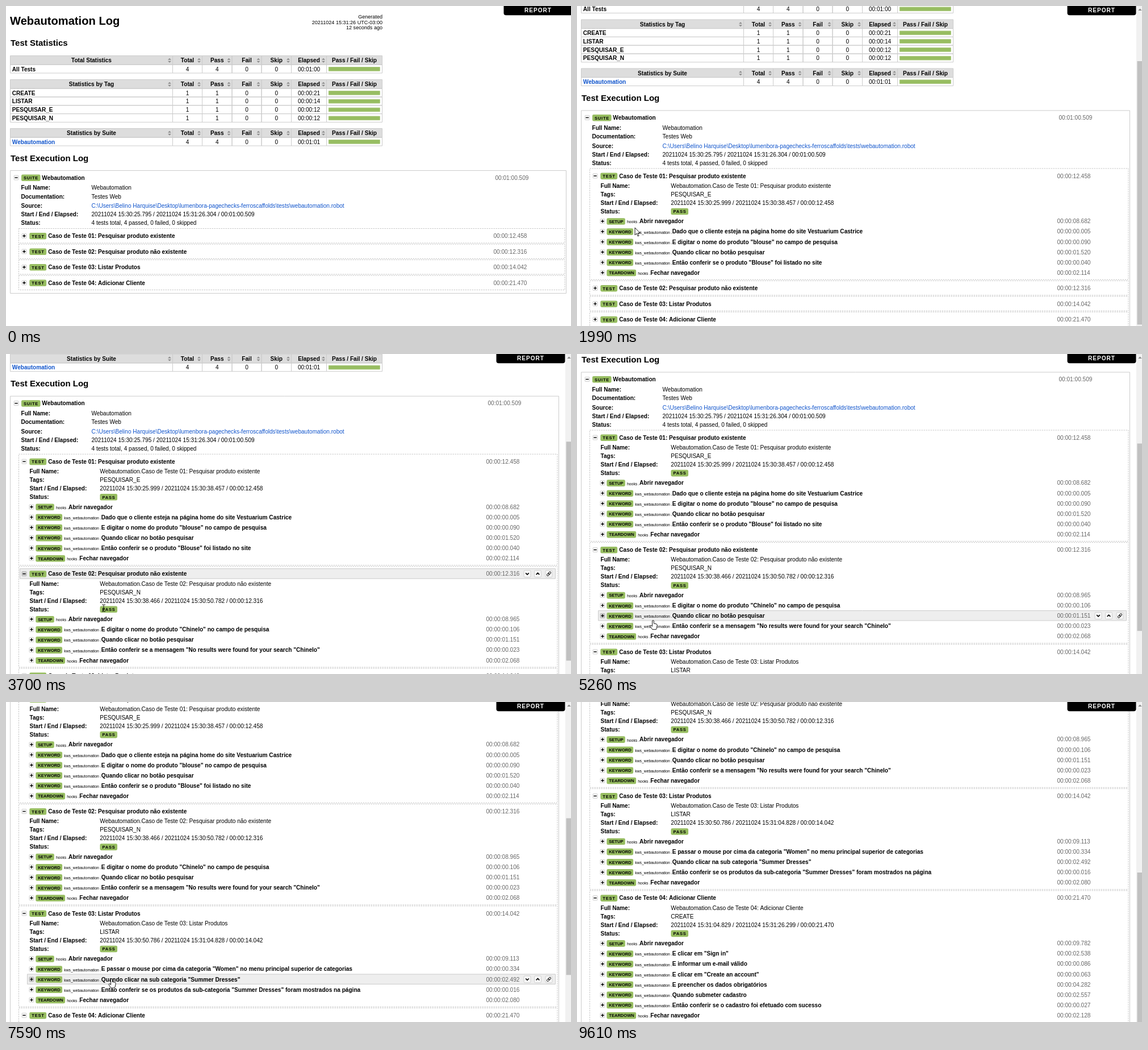
These frames come from a looping animation (995x563 px, 9.81 s). An HTML page with a canvas:

```html
<!DOCTYPE html>
<html lang="en">
<head>
<meta charset="utf-8">
<title>Test log</title>
<style>
  html, body { margin: 0; width: 100%; height: 100%; overflow: hidden; background: #fff; }
  canvas { display: block; }
</style>
</head>
<body>
<canvas id="stage" width="995" height="563"></canvas>
<script>
const ctx = document.getElementById('stage').getContext('2d');
const LOOP = 9810, BASE = 10.08;
const GREEN = '#97bd61', LINE = '#ccc', GRAY = '#666';
const face = (size, weight = 'normal') => `${weight} ${size}px "Liberation Sans", Arial, sans-serif`;
const PLAIN = face(BASE), BOLD = face(BASE, 'bold'), TINY = face(6.8);

const SUITE_INFO = [
  ['Full Name:', 'Webautomation', 319.5],
  ['Documentation:', 'Testes Web', 335],
  ['Source:', 'C:\\Users\\Belino Harquise\\Desktop\\lumenbora-pagechecks-ferroscaffolds\\tests\\webautomation.robot', 351.5],
  ['Start / End / Elapsed:', '20211024 15:30:25.795 / 20211024 15:31:26.304 / 00:01:00.509', 366.5],
  ['Status:', '4 tests total, 4 passed, 0 failed, 0 skipped', 381.5],
];

const TESTS = [
  { name: 'Pesquisar produto existente', tag: 'PESQUISAR_E', from: '30:25.999', to: '30:38.457', time: '12.458', opens: 1250,
    setup: '08.682', teardown: '02.114', steps: [
      ['Dado que o cliente esteja na página home do site Vestuarium Castrice', '00.005'],
      ['E digitar o nome do produto "blouse" no campo de pesquisa', '00.090'],
      ['Quando clicar no botão pesquisar', '01.520'],
      ['Então conferir se o produto "Blouse" foi listado no site', '00.040']] },
  { name: 'Pesquisar produto não existente', tag: 'PESQUISAR_N', from: '30:38.466', to: '30:50.782', time: '12.316', opens: 3000,
    setup: '08.965', teardown: '02.068', steps: [
      ['E digitar o nome do produto "Chinelo" no campo de pesquisa', '00.106'],
      ['Quando clicar no botão pesquisar', '01.151'],
      ['Então conferir se a mensagem "No results were found for your search "Chinelo"', '00.023']] },
  { name: 'Listar Produtos', tag: 'LISTAR', from: '30:50.786', to: '31:04.828', time: '14.042', opens: 4990,
    setup: '09.113', teardown: '02.080', steps: [
      ['E passar o mouse por cima da categoria "Women" no menu principal superior de categorias', '00.334'],
      ['Quando clicar na sub categoria "Summer Dresses"', '02.492'],
      ['Então conferir se os produtos da sub-categoria "Summer Dresses" foram mostrados na página', '00.016']] },
  { name: 'Adicionar Cliente', tag: 'CREATE', from: '31:04.829', to: '31:26.299', time: '21.470', opens: 7240,
    setup: '09.782', teardown: '02.128', steps: [
      ['E clicar em "Sign in"', '02.538'],
      ['E informar um e-mail válido', '00.086'],
      ['E clicar em "Create an account"', '00.063'],
      ['E preencher os dados obrigatórios', '04.282'],
      ['Quando submeter cadastro', '02.557'],
      ['Então conferir se o cadastro foi efetuado com sucesso', '00.027']] },
];

const BURSTS = [[0, 0], [70, 770], [960, 1110], [1250, 1990], [2320, 3280], [3350, 3840],
  [4110, 4660], [4990, 5820], [6080, 7040], [7240, 8150], [8420, 8420], [9470, 9610]];
// time, scroll offset
const SCROLL = [[1500, 0], [1990, 105.6], [3350, 105.6], [3700, 215.3], [3840, 257.5],
  [5330, 257.5], [5820, 409.5], [7660, 409.5], [8150, 616]];
// time, x, y of the pointer's hot spot
const POINTER = [[70, 262, 512], [770, 31, 402], [960, 31, 402], [1110, 32, 405], [1250, 32, 405],
  [1500, 101, 436], [1990, 102, 390], [2320, 102, 390], [2900, 32, 497], [3000, 32, 497],
  [3280, 166, 497], [3350, 166, 497], [3700, 172, 447], [3840, 172, 426], [4110, 172, 426],
  [4660, 32, 524], [4990, 32, 524], [5260, 150, 460], [5330, 150, 460], [5820, 259, 441],
  [6080, 259, 441], [7040, 32, 551], [7240, 32, 551], [7590, 186, 487], [7660, 186, 487], [8150, 293, 445]];
// While scrolling, the hovered row stays the one under the pointer at the start.
const FROZEN = [[1500, 2320, 'arrow'], [3350, 3840, 'beam'], [5330, 6080, 'arrow'], [7660, 8150, 'hand']];
const POINTER_IN = 70, POINTER_OUT = 8420, HOVER_OUT = 9470;

function snap(t) {
  const [a, b] = BURSTS.findLast(([start]) => start <= t);
  const tick = (b - a) / Math.round((b - a) / 69) || 1;
  return Math.min(b, a + Math.floor((t - a) / tick + 0.01) * tick);
}

function follow(keys, t, ease = p => p) {
  const next = keys.findIndex(key => key[0] > t);
  if (next <= 0) return keys.at(next).slice(1);
  const a = keys[next - 1], b = keys[next], p = ease((t - a[0]) / (b[0] - a[0]));
  return a.slice(1).map((v, i) => v + (b[i + 1] - v) * p);
}
const smooth = p => p * p * (3 - 2 * p);
const scrollAt = t => follow(SCROLL, t)[0];
const pointerAt = t => follow(POINTER, t, smooth);

// y is the middle of the capitals
function text(str, x, y, font = PLAIN, color = '#000', align = 'left', spacing = 0) {
  ctx.font = font;
  ctx.fillStyle = color;
  ctx.textAlign = align;
  ctx.letterSpacing = spacing + 'px';
  ctx.fillText(str, x, y + parseFloat(font.split(' ')[1]) * 0.36);
}

function box(x, y, w, h, fill, stroke, radius = 0) {
  ctx.beginPath();
  ctx.roundRect(x, y, w, h, radius);
  if (fill) { ctx.fillStyle = fill; ctx.fill(); }
  if (stroke) { ctx.strokeStyle = stroke; ctx.lineWidth = 1; ctx.stroke(); }
}

function shape(path, x, y, fill, stroke, width = 1) {
  ctx.save();
  ctx.translate(x, y);
  const p = new Path2D(path);
  if (fill) { ctx.fillStyle = fill; ctx.fill(p); }
  if (stroke) { ctx.strokeStyle = stroke; ctx.lineWidth = width; ctx.stroke(p); }
  ctx.restore();
}

function badge(label, x, y, spacing = 0) {
  const font = face(7.56, 'bold');
  ctx.font = font;
  ctx.letterSpacing = spacing + 'px';
  const w = ctx.measureText(label).width + 7.4;
  box(x, y - 5.5, w, 11.6, GREEN, null, 2.4);
  text(label, x + 4, y + 0.4, font, '#000', 'left', spacing);
  return x + w;
}

function toggle(x, y, open, hot) {
  box(x - 4, y - 4, 8, 8, hot ? '#ccc' : '#f6f6f6', hot ? '#bbb' : '#d4d4d4', 1);
  shape(open ? 'M-2.6 0H2.6' : 'M-2.6 0H2.6M0-2.6V2.6', x, y, null, '#000', 1.4);
}

function table(y, title, rows) {
  const edges = [7.5, 293.5, 345.5, 398, 450, 502.5, 564.5, 662.5];
  const heads = [title, 'Total', 'Pass', 'Fail', 'Skip', 'Elapsed', 'Pass / Fail / Skip'];
  const headH = 15.7, rowH = 14.8;
  box(7.5, y, 655, headH, '#ddd');
  heads.forEach((head, i) => {
    const x = edges[i], w = edges[i + 1] - x;
    text(head, x + w / 2, y + 8, BOLD, '#000', 'center');
    if (i < 6) shape('M-3-1 0-4 3-1ZM-3 1 0 4 3 1Z', x + w - 5.5, y + 8.3, '#8a8a8a');
    box(x, y, w, headH, null, LINE);
    rows.forEach((row, r) => {
      const top = y + headH + r * rowH, mid = top + rowH / 2;
      box(x, top, w, rowH, null, LINE);
      if (i === 0) text(row[0], x + 3.3, mid + 0.3, BOLD, row[3] || '#000');
      else if (i === 6) box(x + 3.8, mid - 3, 90, 6.6, GREEN, '#a9c77d');
      else text(i < 3 ? row[1] : i < 5 ? '0' : row[2], x + w / 2, mid + 0.3, PLAIN, '#000', 'center');
    });
  });
}

// Positions of the tests and their steps, in page coordinates
function layout(t) {
  const rows = [], boxes = [];
  let y = 404.5;
  TESTS.forEach((test, i) => {
    const open = t >= test.opens;
    const steps = [['SETUP', 'Abrir navegador', test.setup],
      ...test.steps.map(step => ['KEYWORD', ...step]),
      ['TEARDOWN', 'Fechar navegador', test.teardown]];
    const height = 27.5 + (open ? 61.4 + 18.1 * steps.length : 0);
    const title = `Caso de Teste 0${i + 1}: ${test.name}`;
    boxes.push({ y, height, test, open, title });
    rows.push({ y, kind: 'TEST', title, time: test.time, open });
    if (open) steps.forEach(([kind, name, time], n) =>
      rows.push({ y: y + 79.8 + 18.1 * n, kind, title: name, time }));
    y += height;
  });
  return { rows, boxes, extra: y - 514.5 };
}

const rowAt = (t, rows) => {
  const y = pointerAt(t)[1] + scrollAt(t);
  return rows.find(row => Math.abs(row.y - y) < 9);
};

function drawButtons(right, y) {
  [55.5, 37, 17.5].forEach(dx => box(right - dx - 6, y - 6, 12, 12, '#f8f8f8', '#d0d0d0', 2));
  shape('M-2.8-1.4 0 1.4 2.8-1.4', right - 55.5, y, null, '#000', 1.7);
  shape('M-2.8 1.4 0-1.4 2.8 1.4', right - 37, y, null, '#000', 1.7);
  ctx.save();
  ctx.translate(right - 17.5, y);
  ctx.rotate(-Math.PI / 4);
  box(-4.4, -1.6, 5, 3.2, null, '#222', 1.6);
  box(-0.6, -1.6, 5, 3.2, null, '#222', 1.6);
  ctx.restore();
}

function drawRow(row, right, hot) {
  const { y, kind, title, time, open } = row, isTest = kind === 'TEST';
  const left = isTest ? 24.5 : 37.5;
  if (hot) {
    box(left, y - 9, right - 6 - left, 17.5, '#eee', LINE);
    drawButtons(right, y);
  }
  toggle(isTest ? 32 : 45, y, open, hot);
  let x = badge(kind, isTest ? 41.3 : 52.3, y, isTest ? 0.79 : 0) + 3.2;
  if (!isTest) {
    const library = kind === 'KEYWORD' ? 'kws_webautomation .' : 'hooks .';
    text(library, x, y + 1.3, TINY);
    x += ctx.measureText(library).width;
  }
  text(title, isTest ? 74.3 : x, y, BOLD);
  text('00:00:' + time, right - 128, y, PLAIN, GRAY);
}

function drawTest({ y, height, test, open, title }, right) {
  ctx.setLineDash([2.4, 1.6]);
  box(22.5, y - 13, right - 25, height - 2, null, '#c4c4c4');
  ctx.setLineDash([]);
  if (!open) return;
  const day = '20211024 15:';
  [['Full Name:', 'Webautomation.' + title], ['Tags:', test.tag],
    ['Start / End / Elapsed:', `${day}${test.from} / ${day}${test.to} / 00:00:${test.time}`], ['Status:', '']]
    .forEach(([label, value], i) => {
      const lineY = y + 17.3 + 15 * i;
      text(label, 41.5, lineY, BOLD);
      text(value, 165.3, lineY);
    });
  badge('PASS', 165.5, y + 62.3, 0.79);
}

function drawPage(rows, boxes, extra, right, hovered) {
  text('Webautomation Log', 7, 25.3, face(20.16, 'bold'));
  ['Generated', '20211024 15:31:26 UTC-03:00', '12 seconds ago'].forEach((line, i) =>
    text(line, 663, 19 + 9.5 * i, face(9.07), '#000', 'right'));
  text('Test Statistics', 8, 65, face(15, 'bold'));
  table(87.5, 'Total Statistics', [['All Tests', 4, '00:01:00']]);
  table(129.5, 'Statistics by Tag', [['CREATE', 1, '00:00:21'], ['LISTAR', 1, '00:00:14'],
    ['PESQUISAR_E', 1, '00:00:12'], ['PESQUISAR_N', 1, '00:00:12']]);
  table(215.5, 'Statistics by Suite', [['Webautomation', 4, '00:01:01', '#15c']]);
  text('Test Execution Log', 8, 267.3, face(15, 'bold'));

  box(7.5, 289.5, right - 7.5, 216 + extra, null, LINE);
  toggle(18, 302, true);
  badge('SUITE', 27, 302, 0.79);
  text('Webautomation', 63.3, 302, BOLD);
  text('00:01:00.509', right - 125, 302, PLAIN, GRAY);
  SUITE_INFO.forEach(([label, value, y]) => {
    text(label, 26.5, y, BOLD);
    text(value, 150.5, y, PLAIN, label === 'Source:' ? '#15c' : '#000');
  });
  boxes.forEach(b => drawTest(b, right));
  rows.forEach(row => drawRow(row, right, row === hovered));
}

function drawScrollbar(scroll, extra) {
  const ratio = 583 / (580 + extra);
  box(985, 0, 14, 563, '#f1f1f1');
  shape('M-3.2 2 0-1.6 3.2 2Z', 991.5, 6, '#8a8a8a');
  box(986.5, 15 + ratio * scroll, 11, 596 * ratio, '#c1c1c1');
}

const CURSORS = {
  arrow: 'M0 0V13L3 10.2 5.1 15 7.1 14.1 5 9.5H9Z',
  hand: 'M-1.4 9V1.2Q-1.4 0 0 0T1.4 1.2V5.4L6 6.3Q7.4 6.8 7.2 8.8L6.4 13 5.4 16H-1.2L-4.5 11.2Q-5.6 9-4 8.4L-1.4 10.4Z',
  beam: 'M-3-6H-.8L0-5.4.8-6H3M0-5.4V5.4M-3 6H-.8L0 5.4.8 6H3',
};

function draw(t) {
  const { rows, boxes, extra } = layout(t);
  const scroll = scrollAt(t), right = extra ? 973.5 : 986.5;
  const frozen = FROZEN.find(([a, b]) => t >= a && t < b);
  const hoverOn = t >= POINTER_IN && t < HOVER_OUT;
  const hovered = hoverOn ? rowAt(frozen ? frozen[0] : t, rows) : null;

  box(0, 0, 995, 563, '#fff');
  ctx.save();
  ctx.translate(0, -scroll);
  drawPage(rows, boxes, extra, right, hovered);
  ctx.restore();

  box(right - 110, -6, 121, 22.3, '#000', null, 4);
  text('REPORT', right - 73.5, 7.2, BOLD, '#fff', 'left', 1);
  if (extra) drawScrollbar(scroll, extra);

  if (t >= POINTER_IN && t < POINTER_OUT) {
    const kind = frozen ? frozen[2] : hovered ? 'hand' : 'arrow';
    shape(CURSORS[kind], ...pointerAt(t), kind === 'beam' ? null : '#fff', '#000', 0.9);
  }
}

function frame() {
  draw(snap(performance.now() % LOOP));
  requestAnimationFrame(frame);
}
frame();
</script>
</body>
</html>
```
